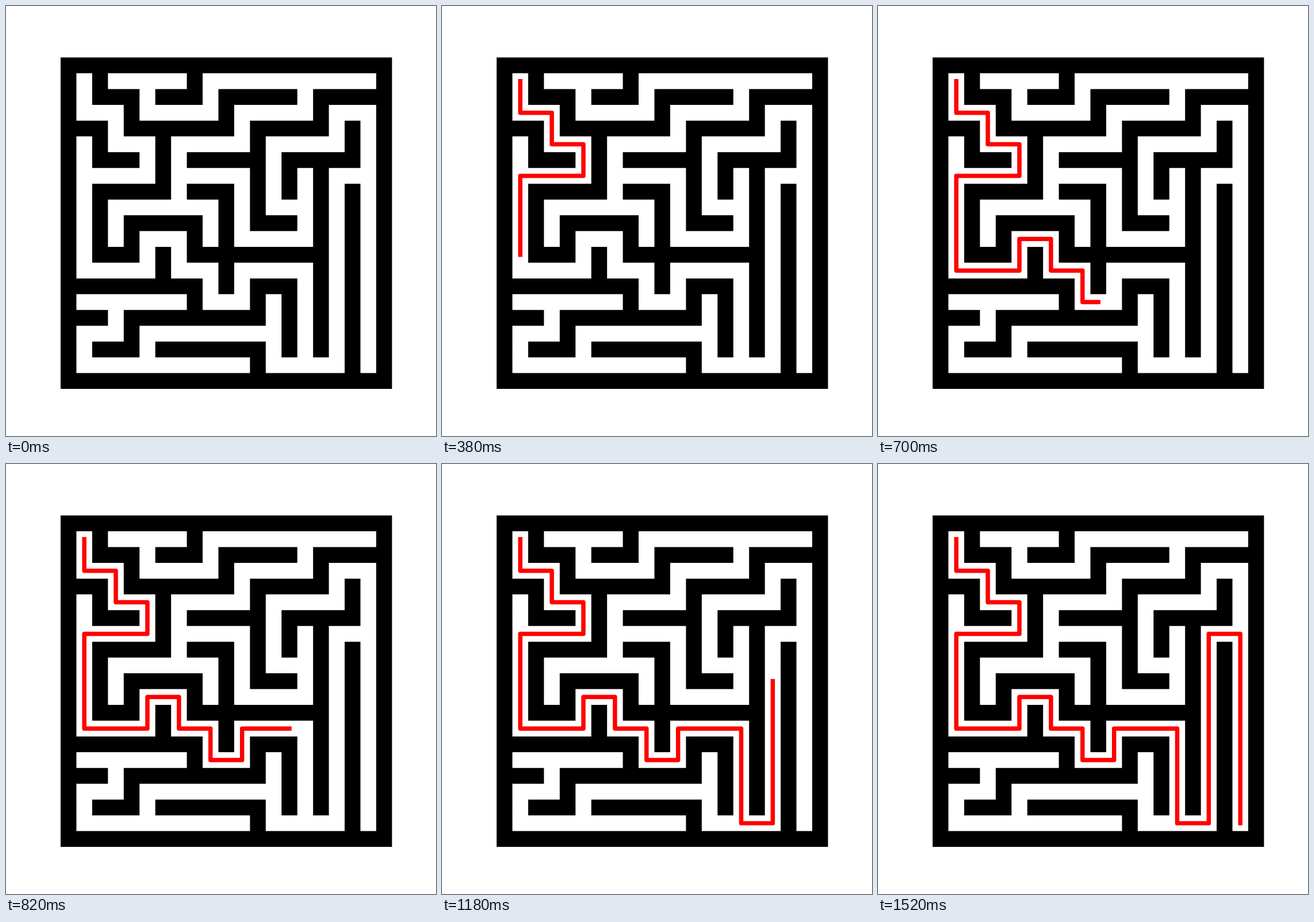
An HTML page that plays this animation: 748 px wide and 748 px high, repeating every 1540 ms.

```html
<!DOCTYPE html>
<html lang="en">
<head>
<meta charset="utf-8">
<title>Maze solution</title>
<style>
  html, body { margin: 0; width: 100%; height: 100%; overflow: hidden; background: #fff; }
  svg { display: block; width: 100vw; height: 100vh; }
</style>
</head>
<body>
<svg viewBox="0 0 748 748">
  <path id="walls" fill="#000"/>
  <path id="trail" fill="none" stroke="#f00" stroke-width="7.48"
        stroke-linecap="square" stroke-linejoin="round"/>
</svg>
<script>
const LEFT = 95, TOP = 89.6, CELL = 27.45;
const STEP = 20, LOOP = 1540;

const maze = [
  '#####################',
  '#.#.....#...........#',
  '#.###.###.#####.#####',
  '#...#.....#.....#...#',
  '###.#######.#####.#.#',
  '#.#...#.....#.....#.#',
  '#.###.#.#####.#####.#',
  '#.....#.....#.#.#...#',
  '#.#####.###.#.#.#.#.#',
  '#.#.......#.#...#.#.#',
  '#.#.#####.#.###.#.#.#',
  '#.#.#...#.#.....#.#.#',
  '#.###.#.#########.#.#',
  '#.....#...#.....#.#.#',
  '#########.#.###.#.#.#',
  '#.......#...#.#.#.#.#',
  '###.#########.#.#.#.#',
  '#...#.........#.#.#.#',
  '#.###.#######.#.#.#.#',
  '#...........#.....#.#',
  '#####################'
];

// Route from the top left cell: direction and number of cells
const route = 'D2 R2 D2 R2 D2 L4 D6 R4 U2 R2 D2 R2 D2 R2 U2 R4 D6 R2 U12 R2 D12';
const dirs = { U: [0, -1], D: [0, 1], L: [-1, 0], R: [1, 0] };

const px = c => +(LEFT + c * CELL).toFixed(2);
const py = r => +(TOP + r * CELL).toFixed(2);

// One path made of horizontal wall runs
let d = '';
maze.forEach((row, r) => {
  for (const run of row.matchAll(/#+/g)) {
    d += `M${px(run.index)} ${py(r)}H${px(run.index + run[0].length)}V${py(r + 1)}H${px(run.index)}Z`;
  }
});
document.getElementById('walls').setAttribute('d', d);

const cells = [[1, 1]];
for (const leg of route.split(' ')) {
  const [dx, dy] = dirs[leg[0]];
  for (let i = +leg.slice(1); i > 0; i--) {
    const [x, y] = cells[cells.length - 1];
    cells.push([x + dx, y + dy]);
  }
}

const trail = document.getElementById('trail');
let shown = -1;

function draw(time) {
  const n = Math.floor((time % LOOP) / STEP);
  if (n !== shown) {
    shown = n;
    const points = cells.slice(0, n + 1).map(([x, y]) => px(x + 0.5) + ' ' + py(y + 0.5));
    trail.setAttribute('d', n ? 'M' + points.join('L') : '');
  }
}

let start = null;
function tick(now) {
  if (start === null) start = now;
  draw(Math.max(0, now - start));
  requestAnimationFrame(tick);
}
draw(0);
requestAnimationFrame(tick);
</script>
</body>
</html>
```
